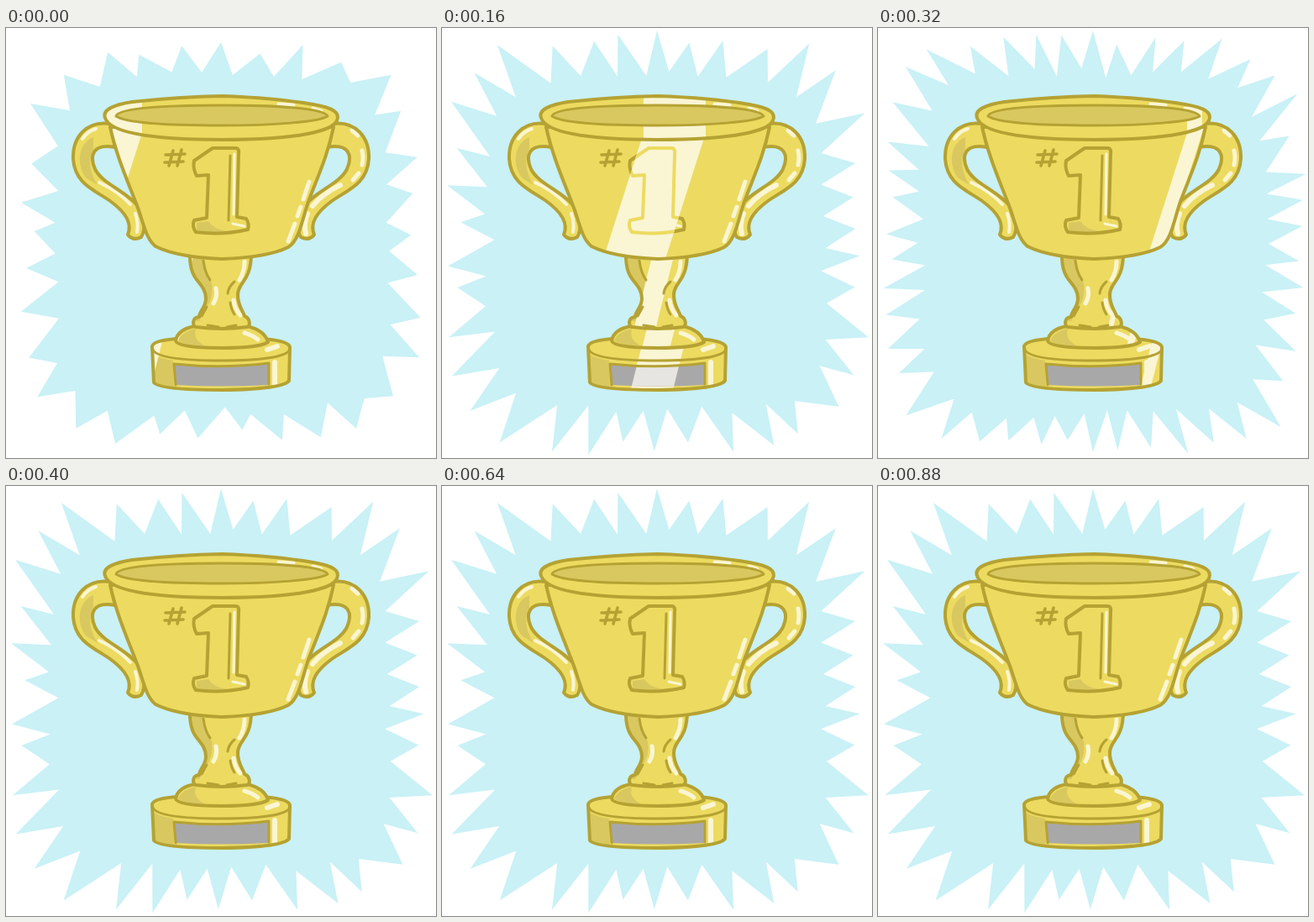
Write an HTML page with a canvas that moves like this. It is 512x512 px and loops after 960 ms.

```html
<!DOCTYPE html>
<html lang="en">
<head>
<meta charset="utf-8">
<title>Number one trophy</title>
<style>
html, body { margin: 0; width: 100%; height: 100%; overflow: hidden; background: #fff; }
canvas { display: block; }
</style>
</head>
<body>
<canvas id="stage" width="512" height="512"></canvas>
<script>
const ctx = document.getElementById('stage').getContext('2d');
const STEP = 80, STEPS = 12, GLEAM_STEPS = 5;
const GOLD = '#ecdb60', DARK = '#d9c85f', LINE = '#b5a233', LIGHT = '#faf5d3';

function seeded(seed) {
  return () => {
    seed = (seed * 16807) % 2147483647;
    return seed / 2147483647;
  };
}

// Spikes between two rounded squares, starting with a tip at the top.
function burst(count, outer, inner, seed) {
  const random = seeded(seed);
  const path = new Path2D();
  const point = (turn, size) => {
    const angle = turn / count * 2 * Math.PI - Math.PI / 2;
    const x = Math.cos(angle), y = Math.sin(angle);
    const radius = size / (Math.abs(x) ** 5 + Math.abs(y) ** 5) ** 0.2;
    path.lineTo(256 + x * radius, 257 + y * radius);
  };
  for (let i = 0; i < count; i++) {
    point(i + (i && random() - 0.5) * 0.4, outer * (1 - 0.08 * (i && random())));
    point(i + 0.5 + (random() - 0.5) * 0.3, inner * (0.97 + 0.06 * random()));
  }
  path.closePath();
  return path;
}

const bursts = [burst(33, 240, 199, 4711), burst(46, 254, 203, 90210), burst(38, 254, 199, 31337)];

const shape = d => new Path2D(d);
const handle = shape(`M124 114C96 110 79 130 80 156C82 186 106 193 124 206C142 219 151 232 145 246
  Q151 254 161 249C168 238 163 224 157 212C143 194 115 186 106 168C99 152 103 137 130 142Z`);
const stem = shape(`M219 268C218 305 237 300 238 322C238 333 230 337 230 344C221 345 222 354 226 356
  Q257 360 287 356C292 354 290 345 284 343C282 336 276 331 276 318C276 302 292 303 292 268Z`);
const dome = shape('M202 372Q205 358 226 355L287 355Q308 360 312 374Q301 381 257 381Q203 381 202 372Z');
const base = shape(`M174 379C176 369 215 369 257 369C300 369 336 370 338 380L337 420Q330 430 257 431
  Q182 431 176 422Z`);
const plate = shape('M200 400Q257 406 313 399L313 425Q257 428 202 425Z');
const body = shape(`M124 118C132 155 147 187 158 217C165 238 168 252 178 260Q204 273 257 275
  Q312 273 336 261C350 253 353 225 361 204C372 175 383 152 390 118Z`);
const rim = shape(`M118 107C114 97 130 91 150 88Q205 82 257 81Q318 83 366 91C390 95 398 101 394 110
  C390 122 350 133 257 133C165 133 123 123 118 107Z`);
const mouth = shape('M131 105C133 95 190 92 257 92C324 92 379 96 383 105C372 112 318 116 257 116C192 116 143 113 131 105Z');
const one = shape(`M224 158L246 143L274 143Q278 144 277 150L275 225L286 227Q290 233 288 240
  Q257 247 226 243Q221 236 224 229L239 226L241 175L227 176Q222 167 224 158Z`);

function line(path, color, width = 4) {
  ctx.strokeStyle = color;
  ctx.lineWidth = width;
  ctx.stroke(typeof path === 'string' ? shape(path) : path);
}

function fill(path, color) {
  ctx.fillStyle = color;
  ctx.fill(typeof path === 'string' ? shape(path) : path);
}

// The gleam slows as it crosses and narrows at the right edge of the cup.
function gleamAt(step) {
  if (step >= GLEAM_STEPS) return null;
  const left = 88 + 82 * step - 3 * step ** 2;
  return [left, Math.min(left + 74, 386)];
}

function shine(path, gleam, { center = 257, scale = 1, y = 125, slope = 0.32, color = LIGHT }, extra) {
  if (!gleam) return;
  const [left, right] = gleam.map(x => center + (x - 257) * scale);
  const at = (x, py) => [x - slope * (py - y), py];
  ctx.save();
  ctx.clip(path);
  ctx.beginPath();
  for (const p of [at(left, 60), at(right, 60), at(right, 450), at(left, 450)]) ctx.lineTo(...p);
  ctx.clip();
  fill(path, color);
  if (extra) extra();
  ctx.restore();
}

function drawHandle(mirrored) {
  ctx.save();
  if (mirrored) ctx.transform(-1, 0, 0, 1, 512, 0);
  fill(handle, GOLD);
  if (mirrored) {
    line('M88 146Q86 155 88 163M92 173L99 181M93 128L100 122', LIGHT, 5);
    line('M114 187Q135 197 147 212M153 221Q158 234 155 245', LIGHT, 6);
  } else {
    fill('M104 130C84 138 84 166 96 179L109 187Q94 162 104 144Z', DARK);
    line('M111 184Q133 194 148 210M154 221Q158 232 156 243', LIGHT, 4);
    line('M91 132Q97 123 107 120', LIGHT, 4);
  }
  line(handle, LINE);
  ctx.restore();
}

function drawFoot(gleam) {
  const small = (center, scale, y, color) => ({ center, scale, y, slope: 0.25, color });

  fill(base, GOLD);
  fill('M176 389Q185 394 199 396L200 430Q181 428 177 422Z', DARK);
  line('M311 383L323 379M320 398L320 424', LIGHT, 6);
  shine(base, gleam, small(244, 0.68, 400));
  fill(plate, '#a9a8a9');
  shine(plate, gleam, small(244, 0.68, 400, '#e6e5e2'));
  line('M202 425L200 400Q257 406 313 399L313 424', LINE, 3);
  line('M175 383C179 393 215 396 257 396C300 396 336 392 338 382', LINE, 3);
  line(base, LINE);

  fill(dome, GOLD);
  fill('M205 372Q210 361 226 358Q222 372 238 379Q211 378 205 372Z', DARK);
  line('M284 363Q294 366 300 371', LIGHT, 5);
  shine(dome, gleam, small(249, 0.45, 368));
  line(dome, LINE);

  fill(stem, GOLD);
  fill('M221 274L234 274Q236 292 245 304Q248 320 238 334L230 349L226 349Q240 332 239 318Q223 302 221 274Z', DARK);
  line('M284 278Q284 290 278 300M250 310Q252 320 247 328M271 324Q272 334 279 342', LIGHT, 5);
  shine(stem, gleam, small(249, 0.35, 300));
  line('M235 277Q237 292 243 300M272 302Q265 308 264 316M267 327Q268 335 272 341M239 332L233 343', LINE, 3);
  line('M240 354L253 356M263 356L274 354', LINE, 3);
  line(stem, LINE);
}

function drawCup(gleam) {
  fill(body, GOLD);
  line('M361 183L354 204M351 213L347 224M344 233L336 254', LIGHT, 5);
  fill(one, GOLD);
  fill('M227 232L241 230Q246 239 263 242Q242 244 227 241Z', DARK);
  line('M272 150L271 222M270 233L284 236', LIGHT, 3);
  line('M267 152L265 229', LINE, 3);
  line(one, LINE);
  shine(body, gleam, {}, () => line(one, GOLD));
  line('M199 146L194 164M209 145L204 164M190 151L213 150M189 160L211 159', LINE, 3.6);
  line(body, LINE);

  fill(rim, GOLD);
  line('M325 91L342 92M366 96L375 99', LIGHT, 5);
  shine(rim, gleam, { slope: 0 });
  fill(mouth, DARK);
  line(mouth, LINE, 3);
  line(rim, LINE);
}

function frame(now) {
  const step = Math.floor(now / STEP) % STEPS;
  const gleam = gleamAt(step);
  ctx.clearRect(0, 0, 512, 512);
  ctx.lineCap = ctx.lineJoin = 'round';
  fill(bursts[step % bursts.length], '#c9f1f6');
  drawHandle(false);
  drawHandle(true);
  drawFoot(gleam);
  drawCup(gleam);
}

const start = performance.now();
function loop() {
  frame(performance.now() - start);
  requestAnimationFrame(loop);
}
loop();
</script>
</body>
</html>
```
